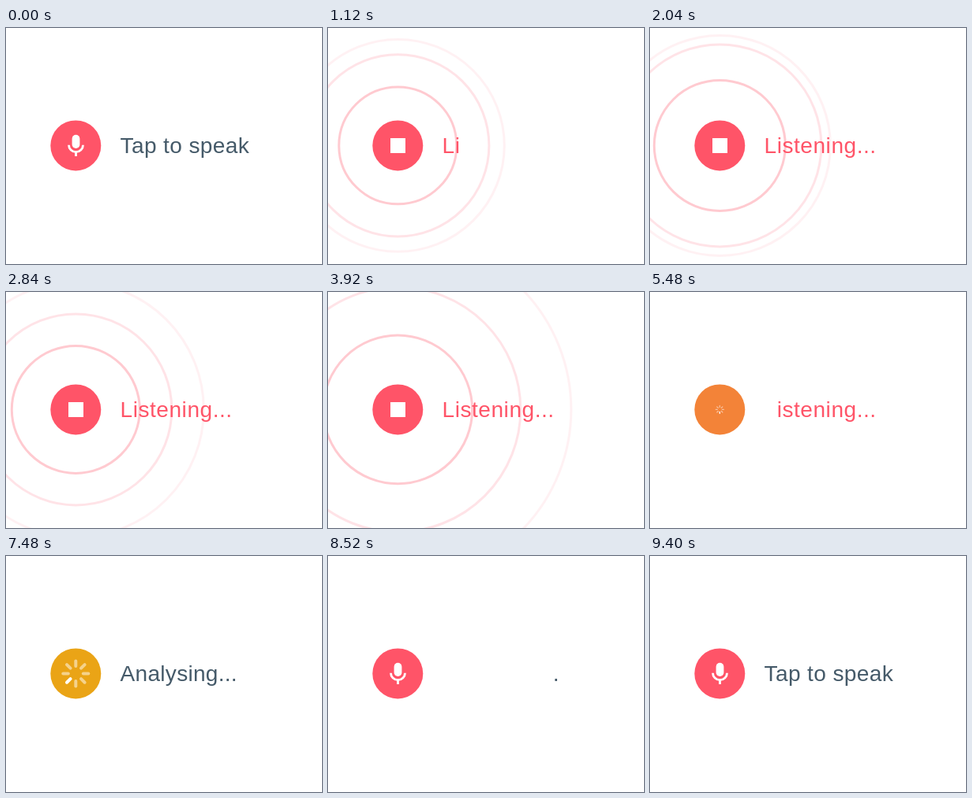
An HTML page with a canvas that plays this animation: 400 by 300 pixels, repeating every 9.44 s.

```html
<!DOCTYPE html>
<html lang="en">
<head>
<meta charset="utf-8">
<title>Voice button</title>
<style>
  html, body { margin: 0; width: 100%; height: 100%; overflow: hidden; background: #fff; }
  canvas { display: block; width: 400px; height: 300px; }
</style>
</head>
<body>
<canvas id="stage" width="400" height="300"></canvas>
<script>
const ctx = document.getElementById('stage').getContext('2d');
const LOOP = 9440, CX = 88.3, CY = 149.4, R = 32;
const PINK = [255, 84, 104], AMBER = [234, 164, 22], SLATE = [69, 90, 105];
const SWAP = 480, TEXT_DELAY = 240, LETTER = 50;

const states = [
  { text: 'Tap to speak', spacing: 0.4, ink: SLATE, fill: PINK, icon: mic },
  { text: 'Listening...', spacing: 0.55, ink: PINK, fill: PINK, icon: stop },
  { text: 'Analysing...', spacing: 0.3, ink: SLATE, fill: AMBER, icon: spinner }
];
const starts = [200, 5200, 7760];

// Each ring: opacity, then [time, radius] pairs
const rings = [
  { alpha: 0.08, keys: [[520, 28], [1040, 136], [1500, 122], [2040, 140], [2400, 178], [2840, 162],
    [3300, 180], [3920, 219.5], [4400, 188], [4900, 222], [5440, 28]] },
  { alpha: 0.16, keys: [[440, 28], [960, 118], [1450, 108], [2040, 128.5], [2400, 146], [2840, 121.5],
    [3300, 130], [3920, 155.5], [4400, 136], [4900, 158], [5400, 28]] },
  { alpha: 0.31, keys: [[360, 28], [880, 78], [1400, 70], [2040, 83], [2400, 91], [2840, 81],
    [3300, 84], [3920, 94.3], [4400, 84], [4900, 94], [5360, 28]] }
];

const rgb = (c, a = 1) => `rgba(${c.join(',')},${a})`;
const mix = (a, b, p) => a.map((v, i) => Math.round(v + (b[i] - v) * p));
const clamp = v => Math.max(0, Math.min(1, v));
const easeOut = p => 1 - (1 - p) ** 2;

function radiusAt(keys, t) {
  const i = keys.findIndex(k => k[0] > t);
  if (i < 1) return 0;
  const [t0, r0] = keys[i - 1], [t1, r1] = keys[i];
  const p = (t - t0) / (t1 - t0);
  return r0 + (r1 - r0) * (1 - Math.cos(Math.PI * p)) / 2;
}

function disc(r) {
  ctx.beginPath();
  ctx.arc(CX, CY, r, 0, Math.PI * 2);
}

function mic() {
  ctx.beginPath();
  ctx.roundRect(-4.7, -13.6, 9.8, 17.2, 4.9);
  ctx.fill();
  ctx.lineWidth = 2.8;
  ctx.lineCap = 'butt';
  ctx.beginPath();
  ctx.arc(0.2, -0.7, 9, Math.PI, 0, true);
  ctx.moveTo(0.2, 8);
  ctx.lineTo(0.2, 13.7);
  ctx.stroke();
}

function stop() {
  ctx.fillRect(-9.3, -9.4, 19, 19);
}

function spinner(t) {
  const lit = ((Math.floor((t - 7420) / 120) + 3) % 8 + 8) % 8;
  ctx.lineWidth = 4;
  ctx.lineCap = 'round';
  for (let i = 0; i < 8; i++) {
    const a = i * Math.PI / 4, x = Math.cos(a), y = Math.sin(a);
    ctx.strokeStyle = `rgba(255,255,255,${i === lit ? 1 : 0.5})`;
    ctx.beginPath();
    ctx.moveTo(x * 9.5, y * 9.5);
    ctx.lineTo(x * 16, y * 16);
    ctx.stroke();
  }
}

function drawIcon(icon, scale, t) {
  if (scale <= 0) return;
  ctx.save();
  ctx.translate(CX, CY);
  ctx.scale(scale, scale);
  ctx.fillStyle = ctx.strokeStyle = '#fff';
  icon(t);
  ctx.restore();
}

function drawText(state, from, to) {
  ctx.font = '28px "Liberation Sans", Arial, sans-serif';
  ctx.letterSpacing = state.spacing + 'px';
  ctx.fillStyle = rgb(state.ink);
  const { text } = state;
  const offset = ctx.measureText(text).width - ctx.measureText(text.slice(from)).width;
  ctx.fillText(text.slice(from, to), 144.6 + offset, 158.7);
}

function draw(t) {
  ctx.fillStyle = '#fff';
  ctx.fillRect(0, 0, 400, 300);

  ctx.lineWidth = 3;
  for (const { alpha, keys } of rings) {
    const r = radiusAt(keys, t);
    if (r <= R - 2) continue;
    ctx.strokeStyle = rgb(PINK, alpha);
    disc(r);
    ctx.stroke();
  }

  // Latest change of state; before the first one the button rests
  const step = starts.filter(s => s <= t).length - 1;
  const old = states[Math.max(step, 0)];
  const next = step < 0 ? old : states[(step + 1) % 3];
  const age = step < 0 ? LOOP : t - starts[step];
  const p = clamp(age / SWAP);

  ctx.fillStyle = rgb(mix(old.fill, next.fill, p));
  disc(R);
  ctx.fill();
  if (p < 0.5) drawIcon(old.icon, 1 - (p * 2) ** 2, t);
  else drawIcon(next.icon, easeOut(p * 2 - 1), t);

  const count = Math.max(0, Math.floor((age - TEXT_DELAY) / LETTER) + 1);
  const length = old.text.length;
  if (count < length) drawText(old, count, length);
  else drawText(next, 0, count - length);
}

function tick() {
  draw(performance.now() % LOOP);
  requestAnimationFrame(tick);
}
tick();
</script>
</body>
</html>
```
